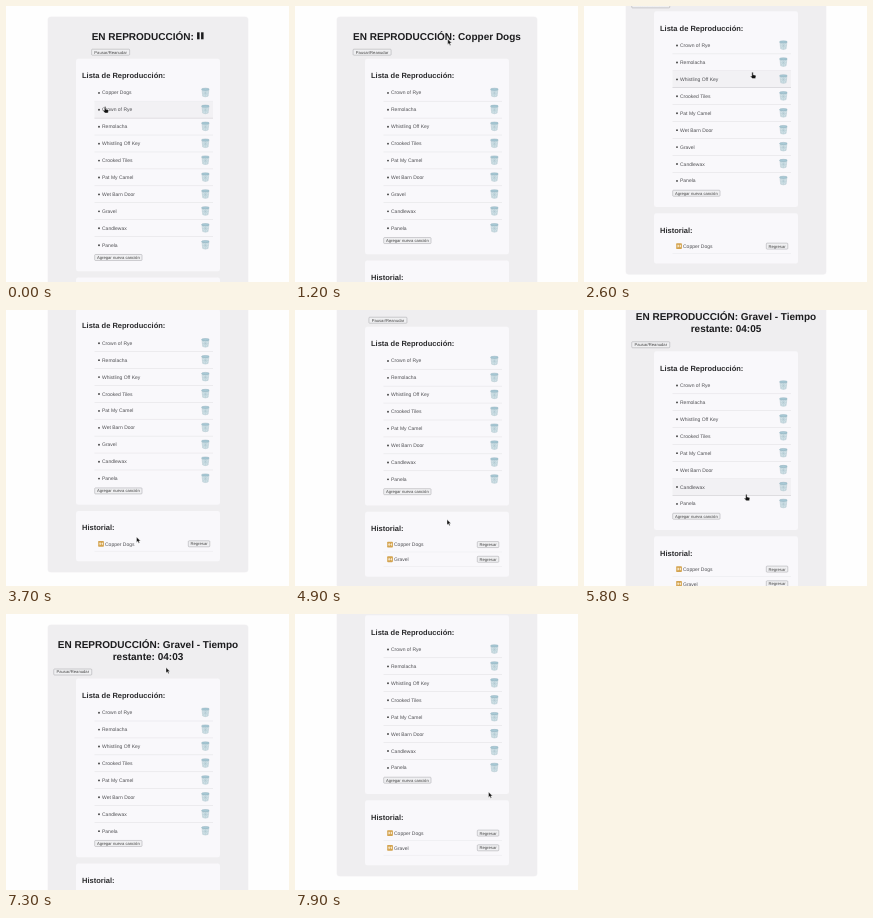
Write an HTML page that moves like this. It is 283 px wide and 276 px high and loops after 8 s.

```html
<!DOCTYPE html>
<html lang="es">
<head>
<meta charset="utf-8">
<style>
html, body { margin: 0; width: 100%; height: 100%; overflow: hidden; background: #fefefe; }
svg {
  display: block; width: 283px; height: 276px;
  font-family: "Liberation Sans", Arial, sans-serif; text-rendering: geometricPrecision;
}
</style>
</head>
<body>
<svg id="stage" viewBox="0 0 283 276"></svg>
<script>
const LOOP = 8000, STEP = 100, HEIGHT = 276, MID = 142, MAX_WIDTH = 188.5;
const ROW = 16.92, HIST_ROW = 14.7, LINE = 11.8;
const stage = document.getElementById('stage');
const pen = document.createElement('canvas').getContext('2d');
pen.font = '700 100px "Liberation Sans", Arial, sans-serif';

const songs = ['Copper Dogs', 'Crown of Rye', 'Remolacha', 'Whistling Off Key', 'Crooked Tiles',
  'Pat My Camel', 'Wet Barn Door', 'Gravel', 'Candlewax', 'Panela'];
// Each play shows its countdown one second after the click.
const plays = [{ at: 500, song: 'Copper Dogs', secs: 270 }, { at: 4200, song: 'Gravel', secs: 245 }];
// The page glides alternately to the bottom and back to the top.
const glides = [2200, 4665, 5600, 6500, 7350], GLIDE = 500, FAR = 66;
const mousePath = [[0, 99, 101], [500, 108, 88], [1500, 165, 18], [2100, 162, 61], [2800, 170, 68],
  [3700, 130.5, 227], [4200, 104, 134], [4900, 152, 209.5], [6300, 166.5, 174.5],
  [7300, 160, 53.5], [7900, 193.5, 178]];

const ease = u => (u = Math.min(1, Math.max(0, u)), u * u * (3 - 2 * u));
const glideAt = t => FAR * glides.reduce((sum, g, i) => sum + (i % 2 ? -1 : 1) * ease((t - g) / GLIDE), 0);

function mouseAt(t) {
  const i = Math.max(1, mousePath.findIndex(p => p[0] >= t));
  const [t0, ...from] = mousePath[i - 1], [t1, ...to] = mousePath[i];
  return from.map((v, k) => v + (to[k] - v) * ease((t - t0) / (t1 - t0)));
}

const titleWidth = s => pen.measureText(s).width / 10;
function wrap(s) {
  return s.split(' ').reduce((lines, word) => {
    const joined = `${lines[lines.length - 1]} ${word}`.trim();
    if (titleWidth(joined) > MAX_WIDTH) lines.push(word);
    else lines[lines.length - 1] = joined;
    return lines;
  }, ['']);
}

const text = (x, y, s, size, color = '#505054', extra = '') =>
  `<text x="${x}" y="${y + size * .35}" font-size="${size}" fill="${color}" ${extra}>${s}</text>`;
const rect = (x, y, w, h, fill, extra = '') =>
  `<rect x="${x}" y="${y}" width="${w}" height="${h}" fill="${fill}" ${extra}/>`;
const path = (d, fill, stroke, width) =>
  `<path d="${d}" fill="${fill}" stroke="${stroke}" stroke-width="${width}"/>`;
const at = (x, y, s) => `<g transform="translate(${x} ${y})">${s}</g>`;
const bold = 'font-weight="700"', centered = bold + ' text-anchor="middle"';

const button = (x, y, w, s) =>
  rect(x, y - 3, w, 6, '#f0f0f2', 'rx=".8" stroke="#a2a2a6" stroke-width=".5"') +
  text(x + w / 2, y, s, 4.17, '#444', 'text-anchor="middle"');
const card = (y, bottom, title) =>
  rect(70, y, 144, bottom - y, '#f9f8fb', 'rx="2.5"') + text(76, y + 16.8, title, 7.5, '#2a2a2c', bold);
const line = (y, color = '#e4e3e6') => rect(88.5, y, 118.5, .6, color);

const bin =
  path('M-3.5-3.2 -2.7 3.5Q0 4.8 2.7 3.5L3.5-3.2Z', '#cfe0e6', '#a9c0c8', .4) +
  path('M-2.2-2 2.4 2.8M2.2-2 -2.4 2.8M0-2V4M-3 .5H3', 'none', '#a9c2cb', .35) +
  '<ellipse cy="-3.4" rx="3.8" ry="1.1" fill="#a9cad6" stroke="#7fa3b0" stroke-width=".4"/>';
const back =
  rect(-2.9, -2.9, 5.8, 5.8, '#d3a34f', 'rx=".8"') +
  path('M-.1-1.5V1.5L-1.9 0ZM2-1.5V1.5L.2 0Z', '#f8ead0', 'none', 0) + rect(-2.2, -1.5, .5, 3, '#f8ead0');
const arrow = path('M0 0V5.4L1.3 4.3 2.2 6.3 3.2 5.8 2.3 3.9H4Z', '#111', '#fff', .4);
const hand = path('M-.6 0Q.2-.8.8 0V2.2L3 2.7Q3.7 3 3.5 4L3 6H0L-2 3.8Q-1.8 2.9-.6 3.6Z', '#111', '#fff', .4);

function titleText(now, t) {
  const heading = 'EN REPRODUCCIÓN:';
  if (!now) return heading;
  const elapsed = Math.floor((t - now.at) / 1000) - 1;
  if (elapsed < 0) return `${heading} ${now.song}`;
  const secs = now.secs - elapsed;
  const clock = [secs / 60, secs % 60].map(n => String(Math.floor(n)).padStart(2, '0')).join(':');
  return `${heading} ${now.song} - Tiempo restante: ${clock}`;
}

function scene(t) {
  const played = plays.filter(p => p.at <= t), now = played[played.length - 1];
  const left = songs.filter(s => !played.some(p => p.song === s));
  const lines = wrap(titleText(now, t));
  const pause = now ? 0 : 10.5;
  const width = lines.length > 1 ? MAX_WIDTH : titleWidth(lines[0]) + pause;

  const cardTop = 52.7 + (lines.length - 1) * LINE;
  const first = cardTop + 34;
  const addY = first + (left.length - 1) * ROW + 12.5;
  const histTop = addY + 20;
  const histFirst = histTop + 32.9;
  const histEnd = histFirst + Math.max(played.length - 1, 0) * HIST_ROW + 17.4;
  const boxEnd = histEnd + 10.8;
  const scroll = Math.min(glideAt(t), boxEnd + 14 - HEIGHT);
  const [mx, my] = mouseAt(t);

  let out = rect(41.5, 10.5, 201, boxEnd - 10, '#f5f4f6', 'rx="3.5"') +
    rect(42, 11, 200, boxEnd - 11, '#efeef0', 'rx="3"');
  lines.forEach((s, i) => out += text(MID - pause / 2, 30.2 + i * LINE, s, 10, '#1c1c1e', centered));
  if (pause) [7.3, 3.3].forEach(dx => out += rect(MID + width / 2 - dx, 26.3, 2.5, 7, '#1c1c1e'));
  out += button(MID - width / 2, cardTop - 6.5, 38, 'Pausar/Reanudar');

  let hovering = false;
  out += card(cardTop, addY + 13.8, 'Lista de Reproducción:');
  left.forEach((song, i) => {
    const y = first + i * ROW;
    const over = mx > 88.5 && mx < 207 && Math.abs(my + scroll - y) < ROW / 2;
    hovering ||= over;
    if (over) out += rect(88.5, y - 8.2, 118.5, ROW, '#f2f1f4');
    if (over || i < left.length - 1) out += line(y + 8.2, over ? '#cfced2' : undefined);
    out += `<circle cx="93" cy="${y + .2}" r=".95" fill="#444"/>` + text(96, y, song, 5) + at(199.4, y, bin);
  });
  out += button(88.7, addY, 47.3, 'Agregar nueva canción');

  out += card(histTop, histEnd, 'Historial:');
  played.forEach((p, i) => {
    const y = histFirst + i * HIST_ROW;
    out += line(y + 7.1, '#ecebee') + at(95, y, back) + text(99, y, p.song, 5) +
      button(182.3, y, 21.5, 'Regresar');
  });
  return at(0, -scroll, out) + at(mx, my, hovering ? hand : arrow);
}

let shown = -1;
function frame() {
  const t = Math.floor(performance.now() % LOOP / STEP) * STEP;
  if (t !== shown) stage.innerHTML = scene(shown = t);
  requestAnimationFrame(frame);
}
frame();
</script>
</body>
</html>
```
